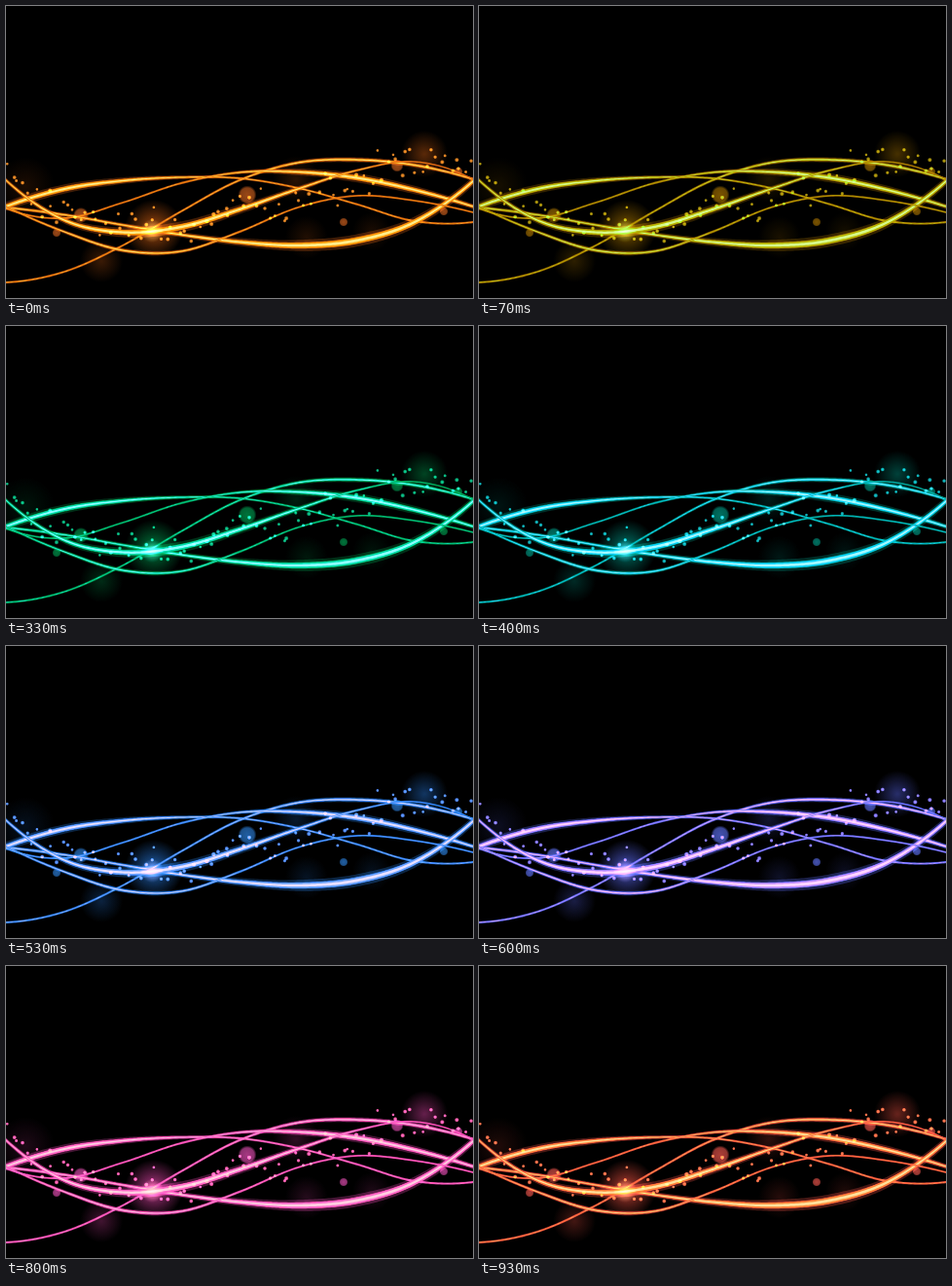
Animation, 480 px wide and 300 px high, one loop 990 ms. Source, as an HTML page with a canvas:

```html
<!DOCTYPE html>
<html lang="en">
<head>
<meta charset="utf-8">
<title>Light waves</title>
<style>
  html, body { margin: 0; width: 100%; height: 100%; overflow: hidden; background: #000; }
  canvas { display: block; width: 480px; height: 300px; }
</style>
</head>
<body>
<canvas id="stage" width="480" height="300"></canvas>
<script>
const canvas = document.getElementById('stage');
const ctx = canvas.getContext('2d');
const W = 480, H = 300, GAP = 60;
const LOOP = 990, STEPS = 15;

const DIM = '225,102,20', BODY = '255,155,5', CORE = '255,238,140';
const DOT = '255,150,40', DISC = '235,110,35';
const rgba = (color, a) => `rgba(${color},${a})`;

// Heights every GAP pixels, thin width, extra width, centre and spread of the swell.
const waves = [
  { ys: [206, 188, 179.5, 176, 177, 187, 203.5, 221, 222], base: 1.3, swell: 2.5, mid: 45, spread: 110 },
  { ys: [284, 273, 246, 211, 179, 161, 158, 163.5, 178], base: 1.3, swell: 1, mid: 370, spread: 110 },
  { ys: [208, 218, 202, 182, 171, 170.5, 176.5, 189, 206], base: 1.2, swell: 2.6, mid: 375, spread: 110 },
  { ys: [207, 214.5, 225, 235, 242.5, 246, 241, 222, 180], base: 1.8, swell: 3.2, mid: 350, spread: 130 },
  { ys: [179, 220, 232.5, 227, 209, 188, 169, 160, 178], base: 0.9, swell: 3.6, mid: 170, spread: 140 },
  { ys: [206, 232, 251, 252, 232, 207, 195, 200, 212], base: 1.2, swell: 0.9, mid: 130, spread: 90 }
];

// x, y, radius, strength
const hazes = [[152, 229, 30, 0.7], [430, 152, 24, 0.4], [98, 262, 22, 0.26], [20, 185, 30, 0.12],
  [298, 178, 24, 0.18], [309, 238, 22, 0.15], [376, 232, 20, 0.12]];
// x, y, radius
const discs = [[248, 194, 9.5], [77, 215, 8], [402, 164, 6.5], [347, 222, 4.5], [450, 211, 4.5], [52, 233, 4.5], [465, 170, 4.5]];
const swarm = [170, 211, 222, 232, 211, 199, 175, 160, 158];

// Smooth curve through evenly spaced heights.
function curve(ys) {
  const n = ys.length;
  const at = i => i < 0 ? 3 * ys[0] - 3 * ys[1] + ys[2]
    : i < n ? ys[i] : 3 * ys[n - 1] - 3 * ys[n - 2] + ys[n - 3];
  return x => {
    const i = Math.min(n - 2, Math.max(0, Math.floor(x / GAP)));
    const t = x / GAP - i;
    const [a, b, c, d] = [at(i - 1), at(i), at(i + 1), at(i + 2)];
    return b + t / 2 * (c - a + t * (2 * a - 5 * b + 4 * c - d + t * (3 * (b - c) + d - a)));
  };
}

function seeded(seed) {
  return () => {
    seed = (seed * 1664525 + 1013904223) % 4294967296;
    return seed / 4294967296;
  };
}

function wavePath({ ys, base, swell, mid, spread }) {
  const yAt = curve(ys), path = [];
  for (let x = -2; x <= W + 2; x += 2) {
    const dy = (yAt(x + 1) - yAt(x - 1)) / 2, len = Math.hypot(1, dy);
    const width = base + swell * Math.exp(-(((x - mid) / spread) ** 2));
    path.push({ x, y: yAt(x), nx: -dy / len, ny: 1 / len, width });
  }
  return path;
}

function ribbon(path, widthOf, fill) {
  const edge = side => p => {
    const d = side * Math.max(0, widthOf(p.width)) / 2;
    ctx.lineTo(p.x + p.nx * d, p.y + p.ny * d);
  };
  ctx.beginPath();
  path.forEach(edge(1));
  path.slice().reverse().forEach(edge(-1));
  ctx.fillStyle = fill;
  ctx.fill();
}

// Round light that keeps `hold` of its strength up to the middle of its radius.
function glow(x, y, r, color, strength, hold, middle = 0.5) {
  const g = ctx.createRadialGradient(x, y, 0, x, y, r);
  g.addColorStop(0, rgba(color, strength));
  g.addColorStop(middle, rgba(color, strength * hold));
  g.addColorStop(1, rgba(color, 0));
  ctx.fillStyle = g;
  ctx.fillRect(x - r, y - r, 2 * r, 2 * r);
}

function drawDots(count) {
  const rand = seeded(11), yAt = curve(swarm);
  for (let i = 0; i < count; i++) {
    const x = (i + rand()) * W / count;
    const y = yAt(x) + (rand() + rand() - 1) * 24;
    glow(x, y, 1.7 + rand() * 0.9, DOT, 1, 0.8);
  }
}

function drawScene() {
  ctx.fillStyle = '#000';
  ctx.fillRect(0, 0, W, H);
  ctx.globalCompositeOperation = 'lighter';
  for (const [x, y, r, a] of hazes) glow(x, y, r, DIM, a, 0.5);
  for (const [x, y, r] of discs) glow(x, y, r, DISC, 0.65, 0.85, 0.75);

  for (const path of waves.map(wavePath)) {
    ctx.globalCompositeOperation = 'lighter';
    ribbon(path, w => w * 2.7 - 1, rgba(DIM, 0.28));
    ctx.globalCompositeOperation = 'source-over';
    ribbon(path, w => w * 1.4, rgba(DIM, 0.9));
    ribbon(path, w => (w - 0.9) * 1.5, rgba(BODY, 1));
    ribbon(path, w => (w - 1.2) * 0.75, rgba(CORE, 1));
  }

  ctx.globalCompositeOperation = 'lighter';
  glow(150, 231, 12, CORE, 0.6, 0.4);
  drawDots(95);
}

// The whole scene turns once round the colour wheel, on a 10 ms clock.
let shown = -1;
function tick() {
  const t = performance.now() % LOOP;
  let step = STEPS - 1;
  while (Math.round(step * 20 / 3) * 10 > t) step--;
  if (step !== shown) {
    shown = step;
    canvas.style.filter = `hue-rotate(${step * 360 / STEPS}deg)`;
  }
  requestAnimationFrame(tick);
}

drawScene();
tick();
</script>
</body>
</html>
```
